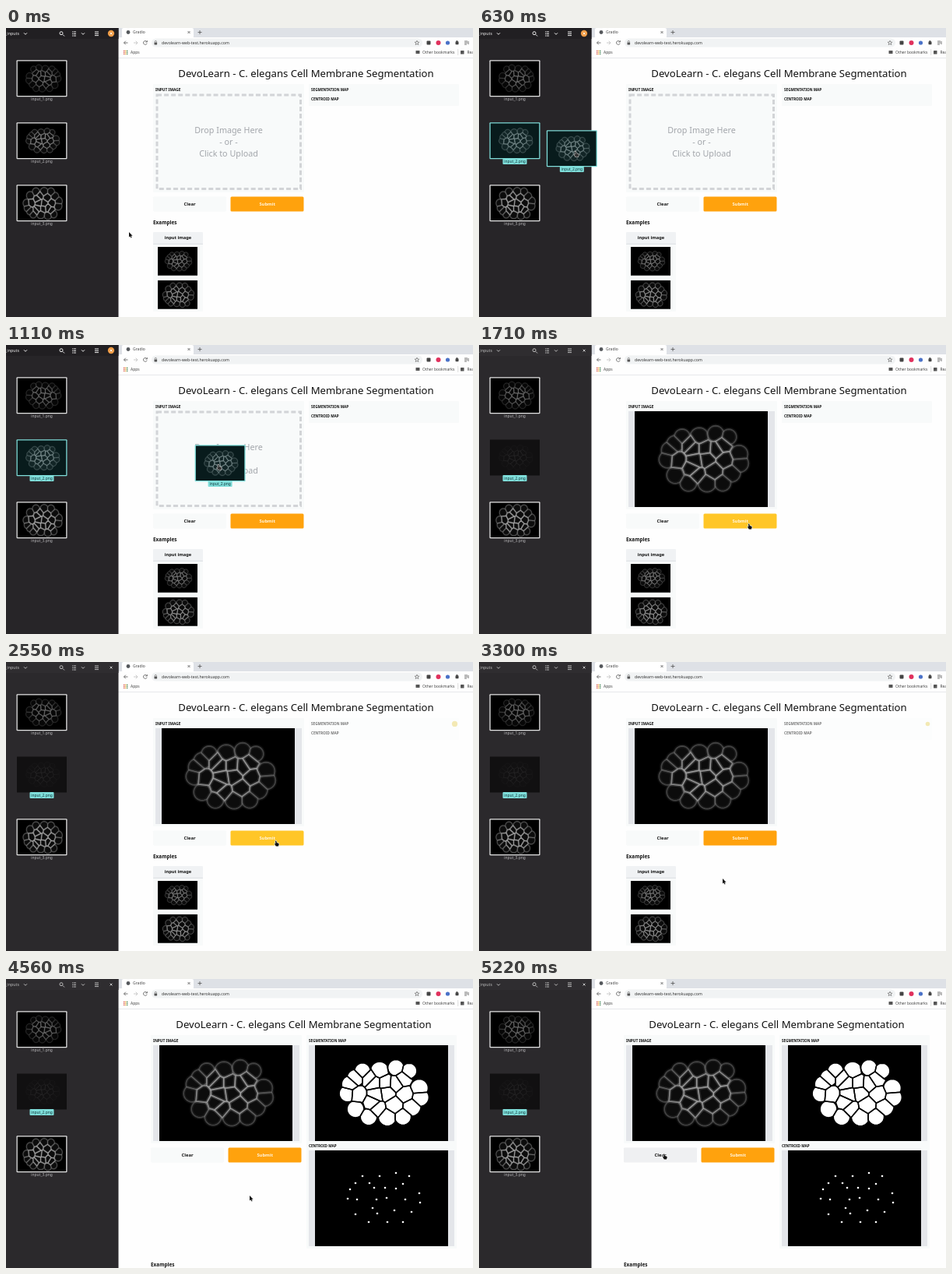
Animation of 600 by 371 pixels, one loop 5250 ms. Source, as an HTML page with a canvas:

```html
<!DOCTYPE html>
<html lang="en">
<head>
<meta charset="utf-8">
<title>Cell membrane segmentation demo</title>
<style>
html, body { margin: 0; width: 100%; height: 100%; overflow: hidden; background: #fff; }
canvas { display: block; }
</style>
</head>
<body>
<canvas id="stage" width="600" height="371"></canvas>
<script>
const ctx = document.getElementById('stage').getContext('2d');
const LOOP = 5250, DROP = 1230, LOADED = 1380, SUBMIT = 2200, RESULT = 4560;
const FONT = '"Fira Sans", "Noto Sans", "Open Sans", sans-serif';
const TEAL = '#7fdeda';
const clamp = v => Math.max(0, Math.min(1, v));

// Cell centres within a 171 x 123 picture
const SEEDS = [
  [61, 33], [83, 33], [104, 29], [121, 33], [52, 42], [70, 42], [113, 43], [45, 50],
  [76, 48], [90, 48], [104, 49], [134, 55], [42, 62], [54, 63], [79, 63], [92, 61],
  [116, 63], [135, 67], [74, 74], [102, 77], [52, 82], [80, 81], [124, 79], [69, 92],
  [93, 92], [113, 92]
];
const CX = 90, CY = 62;

// Part of a polygon that lies nearer to a than to b
function clipNearer(poly, a, b) {
  const side = p => (p[0] - b[0]) ** 2 + (p[1] - b[1]) ** 2 - (p[0] - a[0]) ** 2 - (p[1] - a[1]) ** 2;
  const out = [];
  poly.forEach((p, i) => {
    const q = poly[(i + 1) % poly.length], sp = side(p), sq = side(q);
    if (sp >= 0) out.push(p);
    if (sp * sq < 0) {
      const k = sp / (sp - sq);
      out.push([p[0] + (q[0] - p[0]) * k, p[1] + (q[1] - p[1]) * k]);
    }
  });
  return out;
}

// Outer cells are smaller, which makes the outline lumpy
function makeCell(seed) {
  const edge = Math.hypot((seed[0] - CX) / 54, (seed[1] - CY) / 37);
  const r = 16 - 6.5 * edge ** 2;
  let poly = Array.from({ length: 28 }, (_, i) => {
    const a = i / 28 * Math.PI * 2;
    return [seed[0] + r * Math.cos(a), seed[1] + r * Math.sin(a)];
  });
  for (const other of SEEDS) if (other !== seed) poly = clipNearer(poly, seed, other);
  const path = new Path2D();
  poly.forEach((p, i) => i ? path.lineTo(...p) : path.moveTo(...p));
  path.closePath();
  return { path, edge };
}

const cells = SEEDS.map(makeCell).sort((a, b) => b.edge - a.edge);

function rect(x, y, w, h, color, r = 0) {
  ctx.fillStyle = color;
  ctx.beginPath();
  ctx.roundRect(x, y, w, h, r);
  ctx.fill();
}

function dot(x, y, r, color) {
  ctx.fillStyle = color;
  ctx.beginPath();
  ctx.arc(x, y, r, 0, 7);
  ctx.fill();
}

function line(d, color, width = 0.8) {
  ctx.strokeStyle = color;
  ctx.lineWidth = width;
  ctx.stroke(new Path2D(d));
}

function text(s, x, y, size, color = '#111', weight = 400, align = 'left') {
  ctx.font = `${weight} ${size}px ${FONT}`;
  ctx.textAlign = align;
  ctx.fillStyle = color;
  ctx.fillText(s, x, y);
}

// Draws inside a picture of width w, using 171 x 123 units
function picture(x, y, w, paint) {
  rect(x, y, w, w * 123 / 171, '#000');
  ctx.save();
  ctx.translate(x, y);
  ctx.scale(w / 171, w / 171);
  paint();
  ctx.restore();
}

function embryo(x, y, w, sx = 1, sy = 1, light = 1) {
  picture(x, y, w, () => {
    ctx.translate(CX, CY);
    ctx.scale(sx, sy);
    ctx.translate(-CX, -CY);
    ctx.lineJoin = 'round';
    ctx.strokeStyle = '#b4b4b4';
    ctx.fillStyle = '#0c0c0c';
    for (const { path, edge } of cells) {
      const bright = light * (edge > 0.72 ? 0.3 : 0.6);
      ctx.globalAlpha = Math.min(1, light);
      ctx.fill(path);
      ctx.globalAlpha = bright * 0.25;
      ctx.lineWidth = 5;
      ctx.stroke(path);
      ctx.globalAlpha = bright;
      ctx.lineWidth = w < 100 ? 2.2 : 1.7;
      ctx.stroke(path);
    }
  });
}

function segmentation(x, y, w) {
  picture(x, y, w, () => {
    ctx.fillStyle = '#fff';
    ctx.strokeStyle = '#000';
    ctx.lineWidth = 1.5;
    for (const { path } of cells) ctx.fill(path);
    for (const { path } of cells) ctx.stroke(path);
  });
}

function centroids(x, y, w) {
  picture(x, y, w, () => SEEDS.forEach(([px, py]) => dot(px, py, 1.3, '#fff')));
}

function fileLabel(name, x, y, selected) {
  if (selected) rect(x - 15.5, y - 4, 31, 8, TEAL, 1);
  text(name, x, y + 1.6, 4.9, selected ? '#153c40' : '#b9b8ba', 400, 'center');
}

function thumb(x, y, name, shape, state) {
  if (state === 'cut') {
    embryo(x, y + 0.5, 64, ...shape, 0.14);
    rect(x, y, 64, 47, 'rgba(43,41,44,.4)');
  } else {
    rect(x - 0.5, y + 0.3, 65, 47, state ? TEAL : '#e4e4e4', 1);
    ctx.save();
    ctx.beginPath();
    ctx.rect(x + 0.8, y + 1.6, 62.4, 44.4);
    ctx.clip();
    embryo(x, y + 0.7, 64, ...shape);
    if (state) rect(x, y, 64, 47, 'rgba(50,170,175,.16)');
    ctx.restore();
  }
  fileLabel(name, x + 32, y + 50, !!state);
}

function files(t) {
  const active = t < DROP, ink = active ? '#eee' : '#bbb';
  rect(0, 0, 144.5, 371, active ? '#272528' : '#2b292c');
  rect(0, 0, 144.5, 14, active ? '#211f22' : '#2f2d30');
  text('_inputs', -1, 9, 5.3, ink);
  line('M23 6.3l2 2 2-2M97 6.3l2 2 2-2', ink, 1);
  line('M73 8.5l2 2', ink, 1);
  ctx.beginPath();
  ctx.arc(71, 6.7, 2, 0, 7);
  ctx.stroke();
  line('M85 5h1.5M85 7.5h1.5M85 10h1.5M87 5h3M87 7.5h3M87 10h3M114 5h5M114 7.3h5M114 9.6h5', ink, 1);
  if (active) dot(135, 7, 4.2, '#ee9b45');
  line('M133.7 5.7l2.8 2.8M136.5 5.7l-2.8 2.8', active ? '#fff' : '#ddd', 0.9);
  thumb(14, 41, 'input_1.png', [-1.05, 1.1, 0.6]);
  thumb(14, 121, 'input_2.png', [1, 1], t >= DROP ? 'cut' : t > 370 ? 'selected' : '');
  thumb(14, 201, 'input_3.png', [1.17, -1.3, 1.2]);
}

function browser() {
  rect(144, 0, 456, 371, '#fefefe');
  rect(144, 0, 456, 12, '#dee1e6');
  rect(149, 0, 92, 13, '#fff', 2);
  dot(157, 5.5, 2.4, '#55585c');
  text('Gradio', 163, 7.4, 5, '#444');
  line('M233.5 4l3 3M236.5 4l-3 3M246.5 5.5h5M249 3v5', '#555', 0.8);
  line('M156.5 19h-5M153.8 16.7l-2.3 2.3 2.3 2.3', '#555');
  line('M164 19h5M166.7 16.7l2.3 2.3-2.3 2.3', '#bbb');
  line('M181 17.7a2.4 2.4 0 1 0 .2 2M181.3 16v2h-2', '#555');
  rect(187, 13.5, 348, 11, '#f1f3f4', 5.5);
  rect(190.5, 18.4, 3.6, 3, '#555', 0.4);
  line('M191.2 18.5v-1a1.1 1.1 0 0 1 2.2 0v1', '#555', 0.6);
  text('devolearn-web-test.herokuapp.com', 200, 20.8, 5.2, '#333');
  line('M528 16.2l.8 1.9 2 .1-1.5 1.3.5 2-1.8-1.1-1.8 1.1.5-2-1.5-1.3 2-.1z', '#555', 0.6);
  rect(540.5, 16.5, 5, 5, '#444', 1);
  dot(555.5, 19, 3, '#e0315d');
  dot(567.5, 19, 2.6, '#4a72c8');
  rect(577.5, 17.2, 4, 4, '#444', 0.7);
  dot(579.4, 16.9, 1, '#444');
  line('M589 17h4M589 19h4M589 21h3M594 17v4', '#555');
  for (let i = 0; i < 9; i++)
    rect(151 + i % 3 * 2, 28.7 + Math.floor(i / 3) * 2, 1.4, 1.4, ['#d9534a', '#e9a93b', '#4c8b5c'][i % 3]);
  text('Apps', 160, 33, 4.9, '#444');
  rect(526.5, 29, 5, 4, '#555', 0.5);
  text('Other bookmarks', 535, 33, 5, '#444');
  rect(580.5, 27, 0.6, 8, '#ccc');
  rect(584, 29, 4.5, 4.5, '#555', 0.5);
  text('Reading list', 592.5, 33, 4.9, '#444');
  rect(144, 38, 456, 0.7, '#dfe1e4');
}

const CLEAR = [189, 216.5, 94, 19], SEND = [288.5, 216.5, 94, 19];

function app(t, over) {
  const done = t >= RESULT, busy = t >= SUBMIT && !done;
  ctx.save();
  if (done) ctx.translate(-3, 0);
  text('DevoLearn - C. elegans Cell Membrane Segmentation', 385.5, 63.3, 13.15, '#111', 400, 'center');

  rect(189, 72, 194, 139, '#f8fafa', 1);
  text('INPUT IMAGE', 192, 81, 4.85, '#111', 600);
  if (t < LOADED) {
    ctx.strokeStyle = '#d2d4d7';
    ctx.lineWidth = 3;
    ctx.setLineDash([6, 3.07]);
    ctx.strokeRect(194, 86, 184.5, 120.5);
    ctx.setLineDash([]);
    ['Drop Image Here', '- or -', 'Click to Upload'].forEach((s, i) =>
      text(s, 286, 135 + i * 15.2, 10.75, '#a3a6ab', 400, 'center'));
  } else {
    rect(192, 85, 188, 123, '#e4e6ea');
    embryo(200, 85, 171);
  }

  rect(...CLEAR, over(...CLEAR) ? '#eff0f2' : '#f8fafa', 1);
  text('Clear', 236, 228.3, 5.8, '#111', 600, 'center');
  rect(...SEND, over(...SEND) ? '#ffc627' : '#ffa20d', 1.5);
  text('Submit', 335.7, 228.3, 5.8, '#fff5e0', 600, 'center');

  if (done) {
    rect(389, 72, 193, 274, '#f8fafa', 1);
    text('CENTROID MAP', 392, 216, 4.65, '#111', 600);
    rect(392, 85, 187, 123, '#e4e6ea');
    segmentation(400, 85, 171);
    rect(392, 220, 187, 123, '#e4e6ea');
    centroids(400, 220, 171);
  } else {
    rect(389, 72, 193, 28, busy ? '#fcfdfd' : '#f8fafa', 1);
    text('CENTROID MAP', 392, 93, 4.65, busy ? '#777' : '#111', 600);
  }
  text('SEGMENTATION MAP', 392, 81, 4.65, busy ? '#777' : '#111', 600);
  if (busy) dot(576.5, 79.4, 3.1 + 0.5 * Math.cos((t - 2550) / 188), '#f3e9b4');

  text('Examples', 189, done ? 368.7 : 252.3, 6.4, '#111', 600);
  if (!done) {
    rect(189, 262, 64, 102, '#f8fafa', 1);
    rect(189, 262, 64, 15, '#f0f2f4', 1);
    rect(189, 276.7, 64, 1, '#d9dce0');
    text('input image', 221, 271.2, 5.7, '#111', 600, 'center');
    embryo(195, 281, 51);
    embryo(195, 324, 51, 1.17, -1.25, 1.2);
  }
  ctx.restore();
}

// Pointer: time, x, y
const TRACK = [
  [0, 158, 262], [340, 52, 151], [420, 52, 151], [630, 124, 161], [1110, 273, 156],
  [1230, 285, 155], [1300, 285, 155], [1690, 347, 230], [2680, 347, 230],
  [3100, 313, 278], [4780, 313, 278], [5160, 238, 225], [LOOP, 238, 225]
];

function pointerAt(t) {
  const i = TRACK.findIndex(k => k[0] > t);
  const [t0, x0, y0] = TRACK[i - 1], [t1, x1, y1] = TRACK[i];
  let k = (t - t0) / (t1 - t0);
  if (t < 420 || t > DROP) k = k * k * (3 - 2 * k);
  return [x0 + (x1 - x0) * k, y0 + (y1 - y0) * k];
}

const ARROW = new Path2D('M0 0V6.6L1.5 5.2L2.5 7.4L3.6 6.9L2.6 4.8H4.6Z');
const HAND = new Path2D('M-1-.2Q-.3-1 .4-.2L.8 2L3.2 2.7Q4 3.2 3.6 4.6L3 6.5H-.2L-2 3.6Q-2 2.7-.6 3.2Z');

function pointer(x, y, shape, fill, outline) {
  ctx.save();
  ctx.translate(x, y);
  ctx.lineJoin = 'round';
  ctx.lineWidth = 1.2;
  ctx.strokeStyle = outline;
  ctx.stroke(shape);
  ctx.fillStyle = fill;
  ctx.fill(shape);
  ctx.restore();
}

function draw() {
  const t = performance.now() % LOOP, [x, y] = pointerAt(t);
  const shift = t >= RESULT ? -3 : 0;
  const over = (bx, by, w, h) =>
    x > bx + shift && x < bx + shift + w && y > by && y < by + h && t > 1300;
  browser();
  app(t, over);
  files(t);
  if (t > 420 && t < DROP) {
    const slip = clamp((t - 630) / 480);
    thumb(x - 37 + 7 * slip, y - 30 + 2 * slip, 'input_2.png', [1, 1], 'selected');
    pointer(x, y - 2, HAND, '#333', '#ccc');
  } else {
    pointer(x, y, over(...CLEAR) || over(...SEND) ? HAND : ARROW, '#111', '#fff');
  }
  requestAnimationFrame(draw);
}
draw();
</script>
</body>
</html>
```
